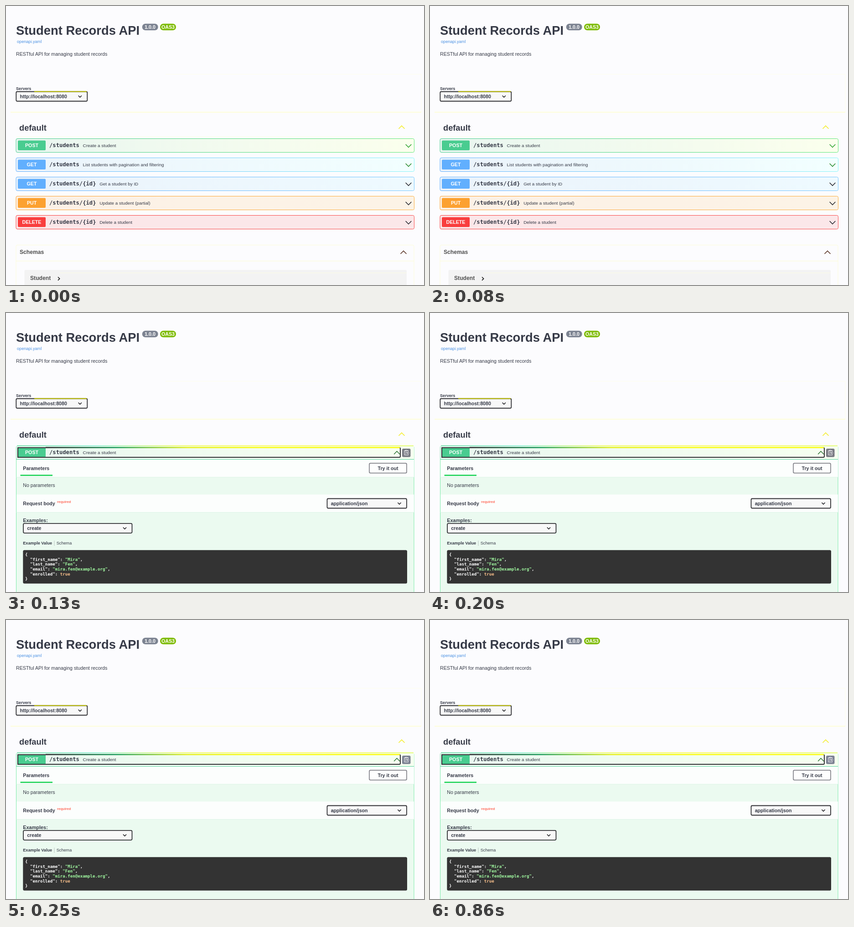
An HTML page that plays this animation: 917x611 px, repeating every 1260 ms.

```html
<!DOCTYPE html>
<html lang="en">
<head>
<meta charset="utf-8">
<title>Student Records API</title>
<style>
html, body { margin: 0; height: 100%; overflow: hidden; background: #fcfcfe; }
svg { display: block; width: 917px; height: 611px; }
text { font: 10.64px "Liberation Sans", Arial, sans-serif; white-space: pre; }
.b { font-weight: 700; }
.mono { font-family: "DejaVu Sans Mono", monospace; font-weight: 700; }
</style>
</head>
<body>
<svg id="stage" viewBox="0 0 917 611"></svg>
<script>
const DARK = '#363a47', INK = '#303034';

const text = (x, y, s, size = 10.64, cls = '', fill = DARK, anchor = 'start') =>
  `<text x="${x}" y="${y}" class="${cls}" text-anchor="${anchor}" style="font-size:${size}px;fill:${fill}">${s}</text>`;
const rect = (x, y, w, h, fill, r = 0, stroke = 'none', sw = 1) =>
  `<rect x="${x}" y="${y}" width="${w}" height="${h}" rx="${r}" fill="${fill}" stroke="${stroke}" stroke-width="${sw}"/>`;
const path = (d, stroke, sw = 1) =>
  `<path d="${d}" fill="none" stroke="${stroke}" stroke-width="${sw}"/>`;
const chevron = (x, y, w, h, color, sw = 1.5) => path(`M${x - w} ${y - h / 2}l${w} ${h}l${w} ${-h}`, color, sw);
const gradient = (id, ...stops) => `<linearGradient id="${id}">${stops.map((c, i) =>
  `<stop offset="${i / (stops.length - 1)}" stop-color="${c}"/>`).join('')}</linearGradient>`;

const select = (x, y, w, label) =>
  rect(x, y, w, 21, '#f8f8f8', 2.5, INK, 1.8) +
  text(x + 8.2, y + 14, label, 10.64, 'b') +
  chevron(x + w - 16, y + 10.5, 3.6, 3.6, '#202024', 1.6);

const method = (y, name, color) =>
  rect(26, y + 4, 61, 21.5, color, 2) + text(56.5, y + 18.6, name, 10.64, 'b', '#fff', 'middle');
const summary = (y, route, note) =>
  text(95, y + 18.5, route, 12.16, 'mono') +
  text(102.7 + route.length * 7.32, y + 18.2, note, 9.88);

const operations = [
  ['POST', '/students', 'Create a student', '#49cc90', '#60e878', '#e9f6f0', '#fbffed', '#28a028'],
  ['GET', '/students', 'List students with pagination and filtering', '#61affe', '#88f4fa', '#ebf3fb', '#f2ffff', '#208828'],
  ['GET', '/students/{id}', 'Get a student by ID', '#61affe', '#78c8ff', '#ebf3fb', '#eefaff', '#202028'],
  ['PUT', '/students/{id}', 'Update a student (partial)', '#fca130', '#fcb040', '#fcf1e6', '#fcf3e6', '#202028'],
  ['DELETE', '/students/{id}', 'Delete a student', '#f93e3e', '#f95050', '#fbe7e9', '#fbe7e9', '#202028'],
];

const row = ([name, route, note, color, edge, fill, fillEnd, arrow], i) => {
  const y = 290.5 + i * 42;
  return gradient('edge' + i, color, edge) + gradient('fill' + i, fill, fillEnd) +
    rect(22, y, 873.5, 30, `url(#fill${i})`, 3, `url(#edge${i})`) +
    method(y, name, color) + summary(y, route, note) +
    chevron(883, y + 15.7, 6.3, 6.5, arrow);
};

const header =
  text(22, 63.2, 'Student Records API', 27.36, 'b') +
  rect(298.7, 38.7, 35, 14.6, '#7d8492', 7.3) + text(316, 49.6, '1.0.0', 10.64, 'b', '#fff', 'middle') +
  rect(338, 38.7, 35, 14.6, '#7fbc05', 7.3) + text(355.5, 49.6, 'OAS3', 10.64, 'b', '#fff', 'middle') +
  text(24, 81, 'openapi.yaml', 9.12, '', '#4990e2') +
  text(22, 109, 'RESTful API for managing student records') +
  text(22, 183.5, 'Servers', 9.12, 'b') +
  select(22.3, 187.5, 156, 'http://localhost:8080') +
  path('M62 187.3H177', '#d0d000', 1.8) +
  path('M10 232.5H911', '#ffffb8') + path('M350 149.5H911V232', '#ffffec') +
  text(29, 272.5, 'default', 18.24, 'b') +
  chevron(868, 265.5, 6.5, -6.5, '#f4ec20');

const collapsed =
  path('M22 286.5H895', '#ffffe4') +
  operations.map(row).join('') +
  rect(22, 523.5, 873, 100, 'none', 3, '#fdfdda') +
  path('M22 558.5H895', '#fbfbd4') +
  text(30, 543, 'Schemas', 12.16, 'b', '#505050') +
  chevron(872, 539.5, 6.5, -6.5, '#502818') +
  rect(40.5, 578, 838.5, 40, '#f3f3f3', 3) +
  path('M118 584.5H879', '#fcfce4') +
  text(53, 600, 'Student', 12.16, 'b', '#505050') +
  path('M114 593.5l3.7 3.7l-3.7 3.7', '#202020', 1.7);

const string = s => `<tspan fill="#a2fca2">"${s}"</tspan>`;
const json = [
  '{',
  `  "first_name": ${string('Mira')},`,
  `  "last_name": ${string('Fen')},`,
  `  "email": ${string('mira.fen@example.org')},`,
  '  "enrolled": <tspan fill="#fcc28c">true</tspan>',
  '}',
];

const expanded =
  gradient('frame', '#60dca0', '#80f0d0', '#f0fc50', '#fcfc40', '#fcfc40', '#e0fc60') +
  gradient('focus', INK, '#20a060', '#e8f020', '#fcfc10', '#fcfc10', '#fcfc10') +
  gradient('summary', '#e9f7f0', '#f0fcf0', '#f6fff0') +
  rect(22.5, 291, 872.5, 340, '#ebfaf0', 3, '#7cecaa') +
  rect(23, 291, 872, 29, 'url(#summary)') +
  rect(24, 290, 870, 1.6, 'url(#frame)') +
  rect(26, 295, 839, 21, 'none', 2, INK, 2) +
  method(290.5, 'POST', '#49cc90') +
  path('M87 295H26V316H87', INK, 2) +
  rect(87, 293.4, 777, 2.6, 'url(#focus)') +
  summary(290.5, '/students', 'Create a student') +
  chevron(857.5, 306, 6.3, -6.5, '#287030') +
  `<g id="copy">${rect(869, 297, 18.5, 18.5, 'inherit', 3).replace('fill="inherit" ', '')}</g>` +
  path('M876 301.5h-2v9.5h8.5v-2M880 301.5h2.5v2.5M876 300.5h4v2h-4zM876 305.5h3M876 308h2M884.5 306.5h-5m2-2l-2 2l2 2', '#fff') +
  rect(23, 321, 872, 38, '#fcfefd') + rect(23, 397.5, 872, 38.5, '#fcfefd') +
  path('M22 320.5H895', '#55d29a') +
  path('M22.5 359.5H895M22.5 436.5H895', '#def5e8') +
  text(37.3, 343.6, 'Parameters', 10.64, 'b') +
  rect(31.5, 354, 70.5, 3, '#34d868') +
  rect(797, 329, 82, 21.5, '#fefefe', 2.5, '#707078', 1.5) +
  text(838, 343.6, 'Try it out', 10.64, 'b', DARK, 'middle') +
  text(37.3, 380.5, 'No parameters') +
  text(37.3, 420.7, 'Request body', 10.64, 'b') + text(112, 416, 'required', 7.6, 'b', '#ff6a5a') +
  select(704.5, 406.5, 174.5, 'application/json') +
  text(37.3, 457.7, 'Examples:', 10.9, 'b') +
  select(38, 460.8, 238.5, 'create') +
  text(37.3, 507, 'Example Value', 9.12, 'b') + path('M106 498.5V510', '#b8c4c0') +
  text(110.8, 507, 'Schema', 9.12) +
  rect(37.3, 519.2, 842.7, 73.3, '#333', 3) +
  json.map((line, i) => text(42, 532 + i * 10.65, line, 9.12, 'mono', '#fff')).join('');

const stage = document.getElementById('stage');
stage.innerHTML = header + `<g id="collapsed">${collapsed}</g><g id="expanded">${expanded}</g>`;
const [closedView, openView, copy] = ['collapsed', 'expanded', 'copy'].map(id => document.getElementById(id));

function draw(now) {
  const t = now % 1260, open = t >= 130;
  closedView.style.display = open ? 'none' : '';
  openView.style.display = open ? '' : 'none';
  copy.setAttribute('fill', t < 250 ? '#787a82' : '#7d8293');
  requestAnimationFrame(draw);
}
draw(0);
</script>
</body>
</html>
```
